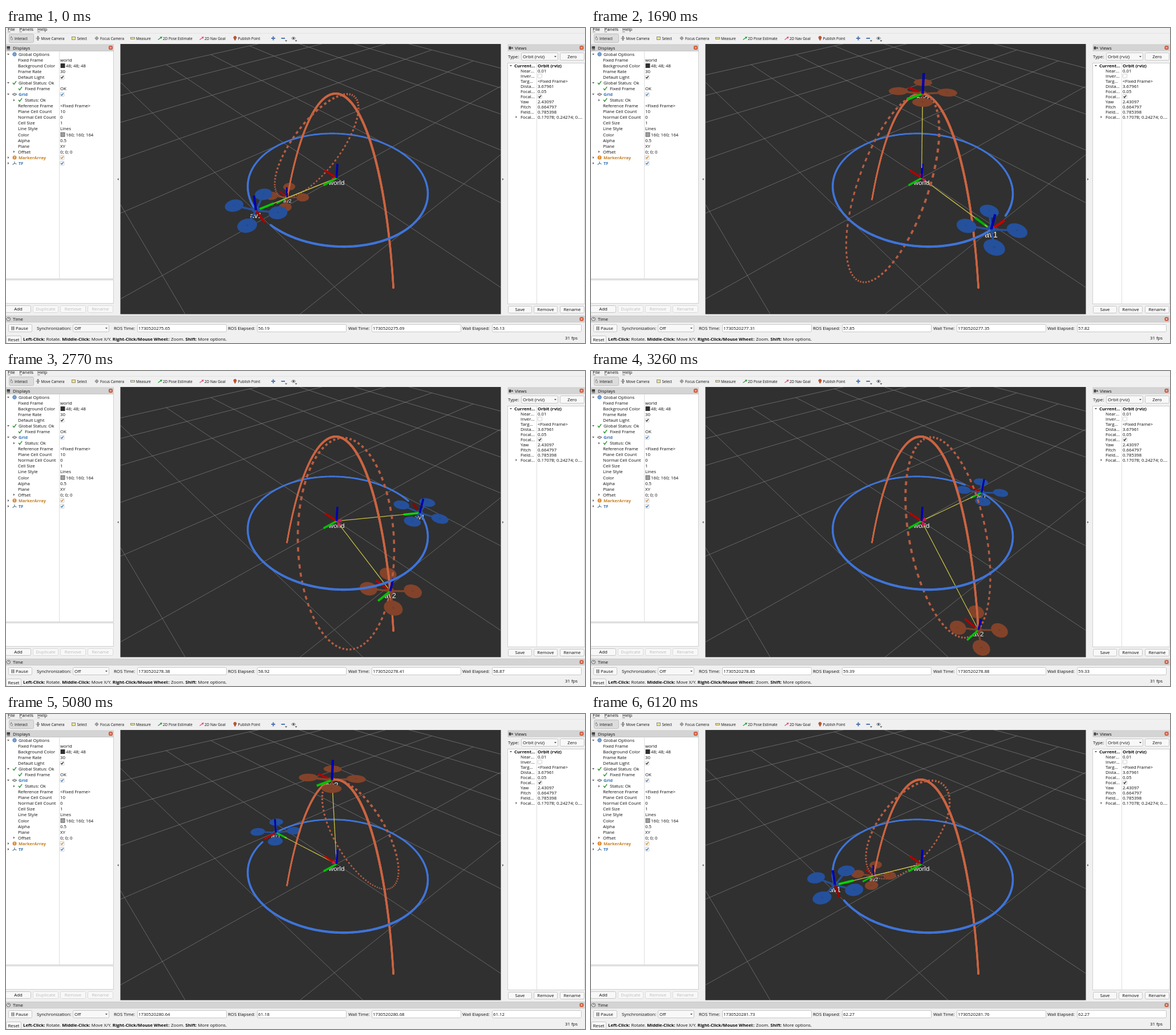
Recreate the animation shown at these times as an HTML page with a canvas. Size 1015 by 552 pixels, loop 6.18 s.

```html
<!DOCTYPE html>
<html lang="en">
<head>
<meta charset="utf-8">
<title>Two drones</title>
<style>
  html, body { margin: 0; width: 100%; height: 100%; overflow: hidden; background: #f0f0f0; }
  svg, canvas { position: absolute; left: 0; top: 0; display: block; }
  canvas { left: 201px; top: 28px; }
  text { font-family: "Open Sans", "Noto Sans", sans-serif; white-space: pre; }
</style>
</head>
<body>
<svg id="ui" width="1015" height="552"></svg>
<canvas id="view" width="666" height="473"></canvas>
<script>
// ---------- window around the 3D view ----------
const parts = [];
const rect = (x, y, w, h, fill, stroke = 'none', r = 0) =>
  parts.push(`<rect x="${x}" y="${y}" width="${w}" height="${h}" rx="${r}" fill="${fill}" stroke="${stroke}" stroke-width=".8"/>`);
const path = (d, stroke, width = 1, fill = 'none') =>
  parts.push(`<path d="${d}" stroke="${stroke}" stroke-width="${width}" fill="${fill}"/>`);
const circle = (x, y, r, fill, stroke = 'none') =>
  parts.push(`<circle cx="${x}" cy="${y}" r="${r}" fill="${fill}" stroke="${stroke}"/>`);
// Text is placed by its vertical middle; *stars* mark bold runs.
const text = (s, x, y, { size = 7.8, fill = '#0c0c0c', bold = false, mid = false, id = '' } = {}) =>
  parts.push(`<text x="${x}" y="${y + 2.8}" font-size="${size}" fill="${fill}"${bold ? ' font-weight="700"' : ''}` +
    `${mid ? ' text-anchor="middle"' : ''}${id && ` id="${id}"`}>` +
    `${s.replace(/</g, '&lt;').replace(/\*(.+?)\*/g, '<tspan font-weight="700">$1</tspan>')}</text>`);
const open = (x, y) => path(`M${x - 2} ${y - 1}h4l-2 2.4z`, 'none', 0, '#555');
const shut = (x, y) => path(`M${x - 1} ${y - 2}v4l2.4 -2z`, 'none', 0, '#555');
const tick = (x, y, color, k = 1) => path(`M${x - 3 * k} ${y}l${2 * k} ${2.6 * k}l${4 * k} ${-5.4 * k}`, color, 1.3);
const check = (x, y, on, color = '#222') => {
  rect(x - 3.5, y - 3.5, 7, 7, '#fff', '#c4c4c4', 1);
  if (on) tick(x, y, color, 0.7);
};
const button = (x, y, w, h, label, off) => {
  rect(x + .5, y + .5, w - 1, h - 1, '#f8f8f8', off ? '#d6d6d6' : '#bcbcbc', 2);
  text(label, x + w / 2, y + h / 2, { mid: true, fill: off ? '#bbb' : '#0c0c0c' });
};
const combo = (x, y, w, label) => {
  rect(x + .5, y + .5, w - 1, 13, '#f8f8f8', '#bcbcbc', 2);
  text(label, x + 3, y + 7);
  open(x + w - 5, y + 7);
};
const titleBar = (x, y, w, label) => {
  rect(x, y, w, 11, '#d4d4d4', '#c6c6c6');
  text(label, x + 12, y + 5.8);
  rect(x + w - 8, y + 2.5, 6, 6, '#e0603c', '#b34a30', 1.5);
  path(`M${x + w - 6.3} ${y + 4.2}l2.6 2.6m0 -2.6l-2.6 2.6`, '#fff', .8);
};

['File', 'Panels', 'Help'].forEach((s, i) => {
  const x = [3, 23.5, 55][i];
  text(s, x, 2.5, { size: 8 });
  path(`M${x} 6.8h4.5`, '#333', .6);
});
path('M0 9.2H1015', '#dedede', .8);
rect(200.5, 28, 667, 473.5, '#303030');

// Toolbar
rect(5.5, 10.5, 43, 15, '#dcdcdc', '#b9b9b9', 2);
[['Interact', 15], ['Move Camera', 61.5], ['Select', 124.5], ['Focus Camera', 165], ['Measure', 228],
 ['2D Pose Estimate', 275], ['2D Nav Goal', 348], ['Publish Point', 406.5]]
  .forEach(([s, x]) => text(s, x, 18, { size: 6.4 }));
path('M8 19v-2.5l1.5 -2v3l2 0v3h-2.6z', '#666', .7, '#eee');
path('M52.5 18h7M56 14.5v7M54.5 16l1.5 -1.7l1.5 1.7M54.5 20l1.5 1.7l1.5 -1.7', '#555', 1);
rect(115.5, 15.5, 6, 5, '#efe48a', '#777');
circle(159, 18, 2.3, '#ddd', '#777');
path('M155.5 18h7M159 14.5v7', '#777', .7);
rect(218.5, 16.5, 7, 3, '#ecdf8e', '#777');
path('M266.5 20.5l6.5 -4.5m-2.8 .1l2.8 -.2l-1 2.6', '#20a030', 1.3);
path('M339.5 20.5l6.5 -4.5m-2.8 .1l2.8 -.2l-1 2.6', '#e0507c', 1.3);
path('M401.5 22l-2.4 -4.5a2.5 2.5 0 1 1 4.8 0z', '#8e3a20', .6, '#c8502c');
path('M465 18h7M468.5 14.5v7', '#4b76b4', 2);
path('M482.5 18h6.5', '#4b76b4', 2);
path('M500 18q4 -4.5 8 0q-4 4.5 -8 0z', '#777', .8, '#fff');
circle(504, 18, 1.7, '#456');
open(491, 22.5);
open(508.5, 22.5);

// Displays panel
titleBar(0, 29, 188.5, 'Displays');
rect(1.5, 32, 5.5, 4.5, '#444');
path('M2 38h5', '#444', 1);
rect(-1, 40.5, 189.5, 399, '#fff', '#c6c6c6');
path('M93.5 41V439', '#dedede', 1);
const blue = { fill: '#2f6fb5', bold: true, size: 7.5 };
const amber = { fill: '#c67f22', bold: true, size: 7.5 };
[['Global Options', 22], ['Fixed Frame', 21, 'world'], ['Background Color', 21, '48; 48; 48'], ['Frame Rate', 21, '30'],
 ['Default Light', 21, true], ['Global Status: Ok', 22], ['Fixed Frame', 33, 'OK'], ['Grid', 22, true, blue],
 ['Status: Ok', 33], ['Reference Frame', 21, '<Fixed Frame>'], ['Plane Cell Count', 21, '10'],
 ['Normal Cell Count', 21, '0'], ['Cell Size', 21, '1'], ['Line Style', 21, 'Lines'], ['Color', 21, '160; 160; 164'],
 ['Alpha', 21, '0.5'], ['Plane', 21, 'XY'], ['Offset', 21, '0; 0; 0'], ['MarkerArray', 22, true, amber], ['TF', 22, true, blue]]
  .forEach(([name, x, value, style], i) => {
    const y = 46 + i * 10.05;
    text(name, x, y, style);
    if (value === true) check(98.5, y, true, style && style.fill);
    else if (value) text(value, /; \d\d/.test(value) ? 105 : 95, y);
  });
rect(96, 62.6, 7, 7, '#303030', '#222');
rect(96, 183.2, 7, 7, '#a0a0a4', '#555');
[46, 96, 116].forEach(y => open(4, y));
[[14, 126.4], [14, 216.8], [4, 226.9], [4, 236.9]].forEach(p => shut(...p));
circle(15, 46, 3.2, '#7ba3d4', '#5580b5');
[[15, 96], [25, 106], [25, 126]].forEach(([x, y]) => tick(x, y, '#1e8a1e'));
path('M11 116.3l4 -2.2l4 2.2l-4 2.2z', '#666', 1, '#ccc');
circle(15, 226.9, 3.5, '#dc8b35');
path('M15 224.8v2.6m0 .7v1', '#fff', 1);
path('M15 237v-3M15 237l-3.5 2.5M15 237l3.5 1.5', '#4d7a8c', 1.1);
rect(-1, 441.5, 189.5, 41, '#fff', '#c6c6c6');
[['Add', -1, 45], ['Duplicate', 47, 45, 1], ['Remove', 95, 45, 1], ['Rename', 143, 45, 1]]
  .forEach(([s, x, w, off]) => button(x, 486, w, 13, s, off));
path('M197.5 263v4l-2.4 -2z', 'none', 0, '#555');
shut(871, 265);

// Views panel
titleBar(880, 29, 134, 'Views');
rect(881.5, 32.5, 4, 5, '#444');
path('M885.5 35l3 -2v4z', 'none', 0, '#444');
text('Type:', 880, 50);
combo(903, 43, 65, 'Orbit (rviz)');
button(971, 43, 43, 14, 'Zero');
rect(879.5, 61.5, 135, 422, '#fff', '#c6c6c6');
path('M930.5 62V483', '#dedede', 1);
const heading = { bold: true, size: 7.8 };
[['Current...', 'Orbit (rviz)'], ['Near...', '0.01'], ['Inver...', false], ['Targ...', '<Fixed Frame>'], ['Dista...', '3.67961'],
 ['Focal...', '0.05'], ['Focal...', true], ['Yaw', '2.43097'], ['Pitch', '0.664797'], ['Field...', '0.785398'],
 ['Focal...', '0.17078; 0.24274; 0....']].forEach(([name, value], i) => {
  const y = 66 + i * 9, style = i ? {} : heading;
  text(name, i ? 902 : 891, y, style);
  if (typeof value === 'string') text(value, 932, y, style);
  else check(936, y, value);
});
open(885, 66);
shut(894.5, 156);
button(880, 487, 42, 13, 'Save');
button(925, 487, 42, 13, 'Remove');
button(971, 487, 43, 13, 'Rename');

// Time panel and status line
titleBar(0, 504.5, 1014, 'Time');
circle(4.5, 510, 3, '#fff', '#555');
path('M4.5 508v2h1.6', '#333', .8);
rect(4.5, 519.5, 41, 13, '#f8f8f8', '#bcbcbc', 2);
path('M10.5 523v6.5M13.5 523v6.5', '#555', 1.5);
text('Pause', 17, 526);
text('Synchronization:', 54, 526);
combo(117, 519, 64, 'Off');
[['ROS Time:', 189, 230, 'ros'], ['ROS Elapsed:', 389, 440, 'rosElapsed'],
 ['Wall Time:', 600, 641, 'wall'], ['Wall Elapsed:', 800, 852, 'wallElapsed']].forEach(([label, x, box, id]) => {
  text(label, x, 526);
  rect(box + .5, 519.5, 156, 13, '#fff', '#bcbcbc', 2);
  text('', box + 2, 526, { id });
});
button(0, 539, 27, 14, 'Reset');
text('*Left-Click:* Rotate. *Middle-Click:* Move X/Y. *Right-Click/Mouse Wheel:*: Zoom. *Shift*: More options.',
  30, 545, { size: 7.75 });
text('31 fps', 980, 543);
document.getElementById('ui').innerHTML = parts.join('');

// ---------- orbit camera ----------
const yaw = 2.43097, pitch = 0.664797, distance = 3.67961, focus = [0.17078, 0.24274, 0.01];
const zoom = 236.5 / Math.tan(0.785398 / 2);
const [cy, sy, cp, sp] = [Math.cos(yaw), Math.sin(yaw), Math.cos(pitch), Math.sin(pitch)];
const ahead = [-cy * cp, -sy * cp, -sp], right = [-sy, cy, 0], up = [-cy * sp, -sy * sp, cp];
const dot = (a, b) => a[0] * b[0] + a[1] * b[1] + a[2] * b[2];
const add = (a, b, k = 1) => a.map((v, i) => v + b[i] * k);
const project = p => {
  const q = add(p, focus, -1), depth = distance + dot(q, ahead);
  return { x: 333 + zoom * dot(q, right) / depth, y: 236.5 - zoom * dot(q, up) / depth, depth };
};

// ---------- scene, painted from far to near ----------
const ctx = document.getElementById('view').getContext('2d');
let items = [];
const put = (depth, paint) => items.push({ depth, paint });

function line(a, b, width, color, { bias = 0, cap = 'butt', steps = 1 } = {}) {
  for (let i = 0; i < steps; i++) {
    const p = project(add(a, add(b, a, -1), i / steps)), q = project(add(a, add(b, a, -1), (i + 1) / steps));
    const depth = (p.depth + q.depth) / 2;
    put(depth - bias, () => {
      ctx.strokeStyle = color;
      ctx.lineWidth = width * zoom / depth;
      ctx.lineCap = cap;
      ctx.beginPath();
      ctx.moveTo(p.x, p.y);
      ctx.lineTo(q.x, q.y);
      ctx.stroke();
    });
  }
}

function disc(center, radius, color) {
  const rim = Array.from({ length: 28 }, (_, i) => {
    const a = i / 28 * 2 * Math.PI;
    return project(add(center, [radius * Math.cos(a), radius * Math.sin(a), 0]));
  });
  put(project(center).depth, () => {
    ctx.fillStyle = color;
    ctx.beginPath();
    rim.forEach(p => ctx.lineTo(p.x, p.y));
    ctx.fill();
  });
}

function label(name, at) {
  const p = project(at), size = 43.5 / p.depth;
  put(p.depth - .015, () => {
    ctx.font = `${size}px "Liberation Sans", Arial, sans-serif`;
    ctx.textAlign = 'center';
    ctx.fillStyle = '#f4f4f4';
    ctx.fillText(name, p.x, p.y + size);
  });
}

function axes(at, dirs) {
  dirs.forEach((dir, i) => {
    const light = Math.round(225 * Math.sqrt(1 - dot(dir, ahead) ** 2));
    line(at, add(at, dir, .2), .023, `rgb(${[0, 1, 2].map(c => c === i ? light : 0)})`, { bias: .03 });
  });
}

// Arrow from a drone to the world origin
function link(from) {
  const length = Math.hypot(...from), neck = from.map(v => v * .06 / length);
  line(from, neck, .008, '#c9c046', { steps: 12 });
  const tip = project([0, 0, 0]), base = project(neck);
  const dx = base.x - tip.x, dy = base.y - tip.y, k = 3.4 / Math.hypot(dx, dy);
  put(base.depth - .04, () => {
    ctx.fillStyle = '#cc1c50';
    ctx.beginPath();
    ctx.moveTo(tip.x, tip.y);
    ctx.lineTo(base.x - dy * k, base.y + dx * k);
    ctx.lineTo(base.x + dy * k, base.y - dx * k);
    ctx.fill();
  });
}

function drone(name, at, dirs, color, dark) {
  for (const i of [-1, 1]) for (const j of [-1, 1]) {
    const hub = add(add(add(at, dirs[0], .165 * i), dirs[1], .165 * j), dirs[2], .02);
    line(at, hub, .02, color, { bias: .005 });
    disc(hub, .093, color);
    disc(add(hub, [0, 0, .003]), .01, dark);
  }
  disc(add(at, [0, 0, .01]), .04, color);
  disc(add(at, [0, 0, .015]), .018, dark);
  label(name, at);
  axes(at, dirs);
  link(at);
}

const worldAxes = [[1, 0, 0], [0, 1, 0], [0, 0, 1]];
const circlePath = t => [Math.cos(t), Math.sin(t), 0];
const archPath = t => [Math.sin(t), 0, Math.cos(2 * t)];
const frameAt = t => [[-Math.sin(t), Math.cos(t), 0], [-Math.cos(t), -Math.sin(t), 0], [0, 0, 1]];

function trail(pathAt, now, color) {
  for (let i = 0; i < 301; i++)
    line(pathAt(now - i * .02), pathAt(now - (i + 1) * .02), .021, color, { cap: 'round' });
}

// Second drone as seen from the first one, carried along with the first one's frame
function relativeTrail(now) {
  const origin = circlePath(now), dirs = frameAt(now);
  const seen = t => {
    const offset = add(archPath(t), circlePath(t), -1), then = frameAt(t);
    return dirs.reduce((p, dir, i) => add(p, dir, dot(offset, then[i])), origin);
  };
  for (let i = 0; i < 160; i += 2)
    line(seen(now - i * .02), seen(now - (i + 1) * .02), .021, '#b75d41');
}

function drawGrid() {
  ctx.strokeStyle = '#6d6d6f';
  ctx.lineWidth = .9;
  ctx.beginPath();
  const segment = (a, b) => {
    const p = project(a), q = project(b);
    if (Math.min(p.depth, q.depth) < .1) return;
    ctx.moveTo(p.x, p.y);
    ctx.lineTo(q.x, q.y);
  };
  for (let i = -5; i <= 5; i++) for (let j = -5; j < 5; j++) {
    segment([i, j, 0], [i, j + 1, 0]);
    segment([j, i, 0], [j + 1, i, 0]);
  }
  ctx.stroke();
}

function drawScene(now) {
  ctx.fillStyle = '#303030';
  ctx.fillRect(0, 0, 666, 473);
  drawGrid();
  items = [];
  label('world', [0, 0, 0]);
  axes([0, 0, 0], worldAxes);
  trail(circlePath, now, '#3f74d8');
  trail(archPath, now, '#cb6441');
  relativeTrail(now);
  drone('av1', circlePath(now), frameAt(now), '#25509c', '#21488e');
  drone('av2', archPath(now), worldAxes, '#82432a', '#743b25');
  items.sort((a, b) => b.depth - a.depth).forEach(item => item.paint());
}

// ---------- timing ----------
const loop = 6180;
// Runs of evenly spaced updates: first, last, count
const updates = [[0, 0, 1], [70, 670, 10], [740, 1020, 5], [1080, 1340, 5], [1410, 1960, 9], [2030, 2300, 5], [2360, 2630, 5],
  [2700, 3260, 9], [3330, 3940, 10], [4000, 4260, 5], [4330, 4590, 5], [4670, 5080, 7], [5130, 5270, 3],
  [5330, 5920, 10], [5990, 6120, 3]]
  .flatMap(([a, b, n]) => Array.from({ length: n }, (_, i) => Math.round((a + (b - a) * i / Math.max(1, n - 1)) / 10) * 10));
// Loop time in ms, then ROS time, wall time, wall elapsed and flight time in seconds
const clock = [
  [0, 75.65, 75.69, 56.13, 1.421], [1020, 76.64, 76.68, 57.15, 2.413], [2300, 77.92, 77.96, 58.43, 3.70],
  [3260, 78.85, 78.88, 59.33, 4.635], [4260, 79.84, 79.88, 60.35, 5.645], [5080, 80.64, 80.68, 61.12, 6.415],
  [6120, 81.73, 81.76, 62.27, 7.51]];

function readClock(ms) {
  const i = Math.max(1, clock.findIndex(row => row[0] >= ms)), a = clock[i - 1], b = clock[i];
  const k = (ms - a[0]) / (b[0] - a[0]);
  return a.slice(1).map((v, j) => v + (b[j + 1] - v) * k);
}

const show = (id, value) => { document.getElementById(id).textContent = value.toFixed(2); };
let shown = -1;

function tickFrame() {
  const ms = performance.now() % loop;
  const step = updates.filter(t => t <= ms).pop();
  if (step !== shown) {
    shown = step;
    const [ros, wall, elapsed, flight] = readClock(step);
    show('ros', 1730520200 + ros);
    show('rosElapsed', ros - 19.46);
    show('wall', 1730520200 + wall);
    show('wallElapsed', elapsed);
    drawScene(flight);
  }
  requestAnimationFrame(tickFrame);
}
tickFrame();
</script>
</body>
</html>
```
